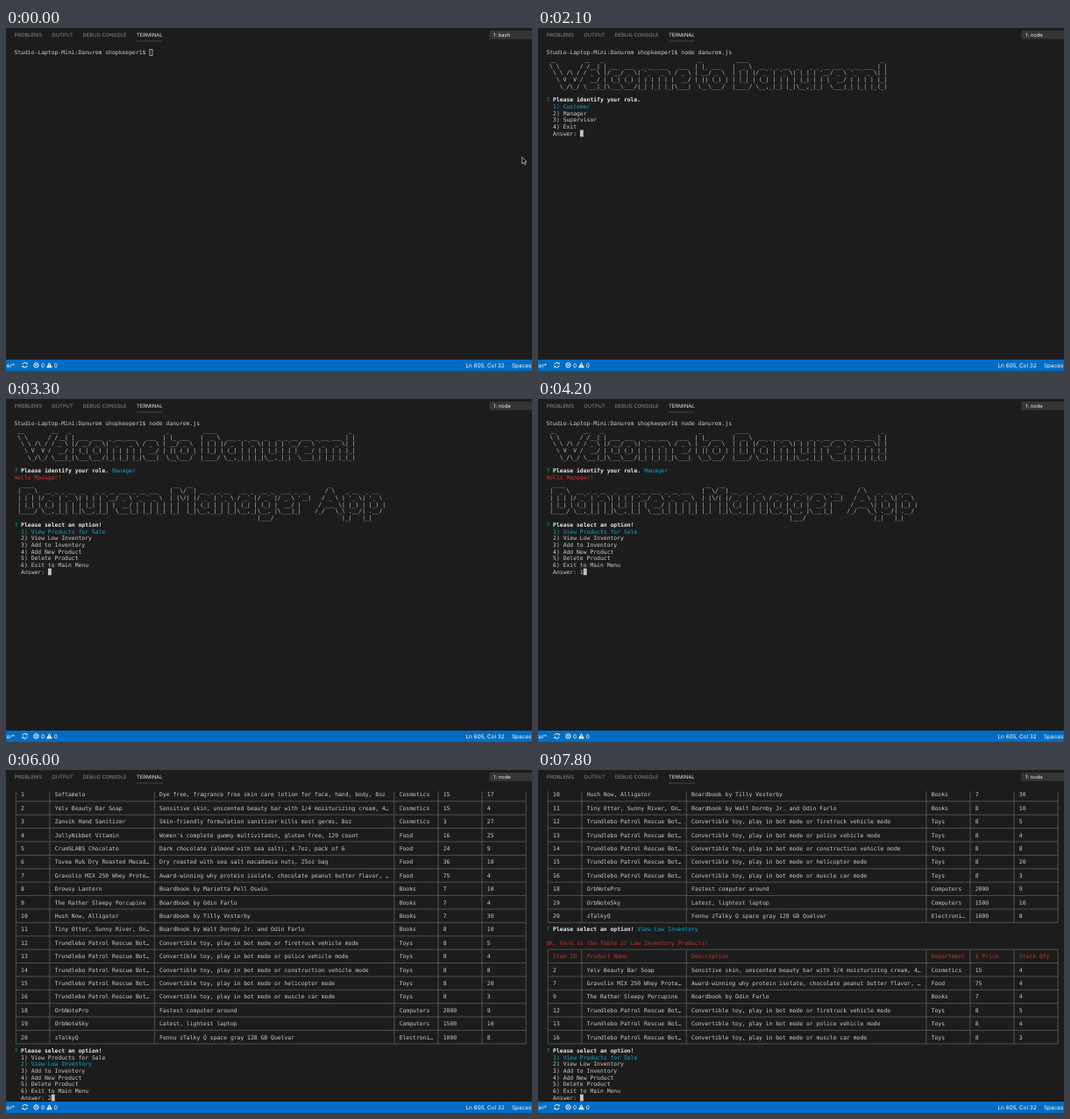
Write an HTML page that moves like this. It is 600 px wide and 392 px high and loops after 8000 ms.

```html
<!DOCTYPE html>
<html lang="en">
<head>
<meta charset="utf-8">
<title>Terminal session</title>
<style>
  html, body { margin: 0; width: 100%; height: 100%; overflow: hidden; background: #1c1c1c; }
  svg { display: block; width: 600px; height: 392px; }
  text { white-space: pre; text-rendering: geometricPrecision; }
  .mono { font: 6.4px "DejaVu Sans Mono", monospace; }
  .tab { font: 5.85px Inter, sans-serif; fill: #8c8c8c; }
  .bar { font: 6.4px Inter, sans-serif; fill: #fff; }
</style>
</head>
<body>
<svg viewBox="0 0 600 392" xmlns="http://www.w3.org/2000/svg">
  <rect width="600" height="392" fill="#1c1c1c"/>
  <g class="tab">
    <text class="tab" x="9.5" y="10.1">PROBLEMS</text>
    <text class="tab" x="52.3" y="10.1">OUTPUT</text>
    <text class="tab" x="87.5" y="10.1">DEBUG CONSOLE</text>
    <text class="tab" x="149" y="10.1" style="fill:#e7e7e7">TERMINAL</text>
    <rect x="149" y="14.7" width="30" height=".6" fill="#5c5c5c"/>
    <rect x="551.5" y="3" width="49" height="9.8" fill="#353535"/>
    <text class="tab" id="shell" x="556" y="10.1" style="fill:#f0f0f0"></text>
  </g>

  <g id="screen" class="mono"></g>

  <rect y="379" width="600" height="13" fill="#016cc1"/>
  <g class="bar">
    <text x="10" y="387.6" text-anchor="end">master*</text>
    <text x="40" y="387.6">0</text>
    <text x="54.8" y="387.6">0</text>
    <text x="524.5" y="387.6">Ln 605, Col 32</text>
    <text x="577" y="387.6">Spaces: 4</text>
  </g>
  <g fill="none" stroke="#fff" stroke-width=".95">
    <path d="M18.9 384.6a2.6 2.6 0 0 1 4.6-1.3M24.1 385.8a2.6 2.6 0 0 1-4.6 1.3"/>
    <path d="M24.5 382v2.3h-2.3zM18.5 388.4v-2.3h2.3z" fill="#fff" stroke="none"/>
    <circle cx="34.5" cy="385.3" r="2.7"/>
    <path d="M33.3 384.1l2.4 2.4M35.7 384.1l-2.4 2.4"/>
    <path d="M49.4 382l3.3 6.3h-6.6z" fill="#fff" stroke="none"/>
    <path d="M49.4 383.9v2.2M49.4 386.7v.8" stroke="#016cc1" stroke-width=".8"/>
  </g>

  <path id="mouse" d="M588.7 147.4v7.6l1.7-1.5 1.2 2.6 1.2-.5-1.2-2.6h2.2z"
        fill="#000" stroke="#fff" stroke-width=".6"/>
</svg>

<script type="text/plain" id="welcome">
 __        __   _                            _
 \ \      / /__| | ___ ___  _ __ ___   ___  | |_ ___
  \ \ /\ / / _ \ |/ __/ _ \| '_ ` _ \ / _ \ | __/ _ \
   \ V  V /  __/ | (_| (_) | | | | | |  __/ | || (_) |
    \_/\_/ \___|_|\___\___/|_| |_| |_|\___|  \__\___/
</script>
<script type="text/plain" id="name">
 ____
|  _ \  __ _ _ __  _   _ _ __ ___ _ __ ___
| | | |/ _` | '_ \| | | | '__/ _ \ '_ ` _ \
| |_| | (_| | | | | |_| | | |  __/ | | | | |
|____/ \__,_|_| |_|\__,_|_|  \___|_| |_| |_|
</script>
<script type="text/plain" id="bang">
 _
| |
| |
|_|
(_)
</script>
<script type="text/plain" id="manager">
 __  __
|  \/  | __ _ _ __   __ _  __ _  ___ _ __
| |\/| |/ _` | '_ \ / _` |/ _` |/ _ \ '__|
| |  | | (_| | | | | (_| | (_| |  __/ |
|_|  |_|\__,_|_| |_|\__,_|\__, |\___|_|
                          |___/
</script>
<script type="text/plain" id="app">
    _
   / \   _ __  _ __
  / _ \ | '_ \| '_ \
 / ___ \| |_) | |_) |
/_/   \_\ .__/| .__/
        |_|   |_|
</script>

<script>
const LOOP = 8000, CW = 3.853, LH = 7.7;
const FG = '#cccccc', BOLD = '#e8e8e8', RED = '#cd3131', CYAN = '#11a8cd', GREEN = '#0dbc79';
const $ = id => document.getElementById(id);
const X = col => 9.4 + col * CW;
const Y = row => 24.2 + row * LH;

const PROMPT = 'Studio-Laptop-Mini:Danurem shopkeeper1$ ';
const COMMAND = 'node danurem.js';
const ROLES = ['Customer', 'Manager', 'Supervisor', 'Exit'];
const OPTIONS = ['View Products for Sale', 'View Low Inventory', 'Add to Inventory',
  'Add New Product', 'Delete Product', 'Exit to Main Menu'];

const EDGES = [0, 10, 41, 112, 125, 138, 151];
const HEAD = ['Item ID', 'Product Name', 'Description', 'Department', '$ Price', 'Stock Qty'];
const bot = (id, kind, qty) => [id, 'Trundlebo Patrol Rescue Bot…',
  `Convertible toy, play in bot mode or ${kind} mode`, 'Toys', 8, qty];
const book = (id, title, author, price, qty) =>
  [id, title, 'Boardbook by ' + author, 'Books', price, qty];
const PRODUCTS = [
  [1, 'Softamelo', 'Dye free, fragrance free skin care lotion for face, hand, body, 8oz', 'Cosmetics', 15, 17],
  [2, 'Yelv Beauty Bar Soap', 'Sensitive skin, unscented beauty bar with 1/4 moisturizing cream, 4…', 'Cosmetics', 15, 4],
  [3, 'Zanvik Hand Sanitizer', 'Skin-friendly formulation sanitizer kills most germs, 8oz', 'Cosmetics', 3, 27],
  [4, 'JollyNibbet Vitamin', "Women's complete gummy multivitamin, gluten free, 120 count", 'Food', 16, 25],
  [5, 'CrumSLABS Chocolate', 'Dark chocolate (almond with sea salt), 4.7oz, pack of 6', 'Food', 24, 9],
  [6, 'Tovea Ruk Dry Roasted Macad…', 'Dry roasted with sea salt macadamia nuts, 25oz bag', 'Food', 36, 10],
  [7, 'Gravolin MIX 250 Whey Prote…', 'Award-winning why protein isolate, chocolate peanut butter flavor, …', 'Food', 75, 4],
  book(8, 'Drowsy Lantern', 'Marietta Pell Oswin', 7, 10),
  book(9, 'The Rather Sleepy Porcupine', 'Odin Farlo', 7, 4),
  book(10, 'Hush Now, Alligator', 'Tilly Vesterby', 7, 30),
  book(11, 'Tiny Otter, Sunny River, On…', 'Walt Dornby Jr. and Odin Farlo', 8, 10),
  bot(12, 'firetruck vehicle', 5),
  bot(13, 'police vehicle', 4),
  bot(14, 'construction vehicle', 8),
  bot(15, 'helicopter', 20),
  bot(16, 'muscle car', 3),
  [18, 'OrbNotePro', 'Fastest computer around', 'Computers', 2000, 9],
  [19, 'OrbNoteSky', 'Latest, lightest laptop', 'Computers', 1500, 10],
  [20, 'zTalkyQ', 'Fennu zTalky Q space gray 128 GB Quelvar', 'Electroni…', 1000, 8]
];
const LOW = PRODUCTS.filter(p => p[5] < 6);

function add(tag, attrs, str) {
  const el = document.createElementNS('http://www.w3.org/2000/svg', tag);
  for (const k in attrs) el.setAttribute(k, attrs[k]);
  if (str !== undefined) el.textContent = str;
  $('screen').append(el);
}

function put(col, row, str, fill = FG, weight = 400) {
  add('text', { x: X(col), y: Y(row) + 6.1, fill, 'font-weight': weight }, str);
}

function caret(col, row, hollow) {
  const inset = hollow ? .4 : 0;
  add('rect', {
    x: X(col) + inset, y: Y(row) + inset, width: CW - 2 * inset, height: LH - 2 * inset,
    fill: hollow ? 'none' : '#c4c4c4', stroke: hollow ? FG : 'none', 'stroke-width': .7
  });
}

function banner(id, col, row, width) {
  $(id).textContent.slice(1).split('\n').forEach((s, i) => {
    if (s) put(col, row + i, s.slice(0, width));
  });
}

function question(row, str, answer) {
  put(0, row, '?', GREEN);
  put(2, row, str, BOLD, 700);
  if (answer) put(3 + str.length, row, answer, CYAN);
}

function menu(row, str, items, pick, typed) {
  question(row, str);
  items.forEach((s, i) => put(2, row + 1 + i, `${i + 1}) ${s}`, i === pick ? CYAN : FG));
  const last = row + 1 + items.length;
  put(2, last, 'Answer: ' + typed);
  caret(10 + typed.length, last);
}

// Without a header the table is cut off by the top of the screen.
function table(row, list, head) {
  const first = head ? row + 1 : row;
  const rows = head ? [HEAD, ...list] : list;
  const top = head ? Y(row + .5) : Y(row);
  const end = Y(first + 2 * rows.length - .5);
  const left = X(.5), right = X(EDGES[6] + .5);
  let d = head ? `M${left} ${top}H${right}` : '';
  for (const c of EDGES) d += `M${X(c + .5)} ${top}V${end}`;
  rows.forEach((cells, i) => {
    d += `M${left} ${Y(first + 2 * i + 1.5)}H${right}`;
    cells.forEach((s, j) => put(EDGES[j] + 2, first + 2 * i, s, cells === HEAD ? RED : FG));
  });
  add('path', { d, fill: 'none', stroke: '#666', 'stroke-width': .7 });
}

const pickOption = (row, pick, typed) => menu(row, 'Please select an option!', OPTIONS, pick, typed);
const askRole = (pick, typed) => { welcome(); menu(7, 'Please identify your role.', ROLES, pick, typed); };

function command() {
  put(0, 0, PROMPT + COMMAND);
}

function welcome() {
  command();
  banner('welcome', 0, 1);
  banner('name', 55, 1, 43);
  banner('bang', 98, 1);
}

function chosenRole() {
  welcome();
  question(7, 'Please identify your role.', 'Manager');
}

function managerHome(typed) {
  chosenRole();
  put(0, 8, 'Hello Manager!', RED);
  banner('name', 1, 9);
  banner('manager', 46, 9);
  banner('app', 89, 9);
  pickOption(15, 0, typed);
}

function allProducts(pick, typed) {
  table(0, PRODUCTS);
  pickOption(38, pick, typed);
}

function lowStock() {
  table(0, PRODUCTS.slice(9));
  question(20, 'Please select an option!', OPTIONS[1]);
  put(0, 22, 'OK, here is the Table of Low Inventory Products!', RED);
  table(23, LOW, true);
  pickOption(38, 0, '');
}

const STEPS = [
  [0, () => { put(0, 0, PROMPT); caret(40, 0, true); }],
  [300, () => { put(0, 0, PROMPT); caret(40, 0); }],
  [900, () => { command(); caret(56, 0); }],
  [1500, () => { command(); caret(0, 1); }],
  [2100, () => askRole(0, '')],
  [2700, () => askRole(1, '2')],
  [3000, () => { chosenRole(); caret(0, 8); }],
  [3300, () => managerHome('')],
  [3900, () => managerHome('1')],
  [4500, () => allProducts(0, '')],
  [5700, () => allProducts(1, '2')],
  [6600, lowStock]
];

let shown = -1;
function render(t) {
  const step = STEPS.filter(s => s[0] <= t).length - 1;
  $('mouse').setAttribute('visibility', t < 600 ? 'visible' : 'hidden');
  if (step === shown) return;
  shown = step;
  $('shell').textContent = t < 1500 ? '1: bash' : '1: node';
  $('screen').replaceChildren();
  STEPS[step][1]();
}

const start = performance.now();
function tick() {
  render((performance.now() - start) % LOOP);
  requestAnimationFrame(tick);
}
tick();
</script>
</body>
</html>
```
